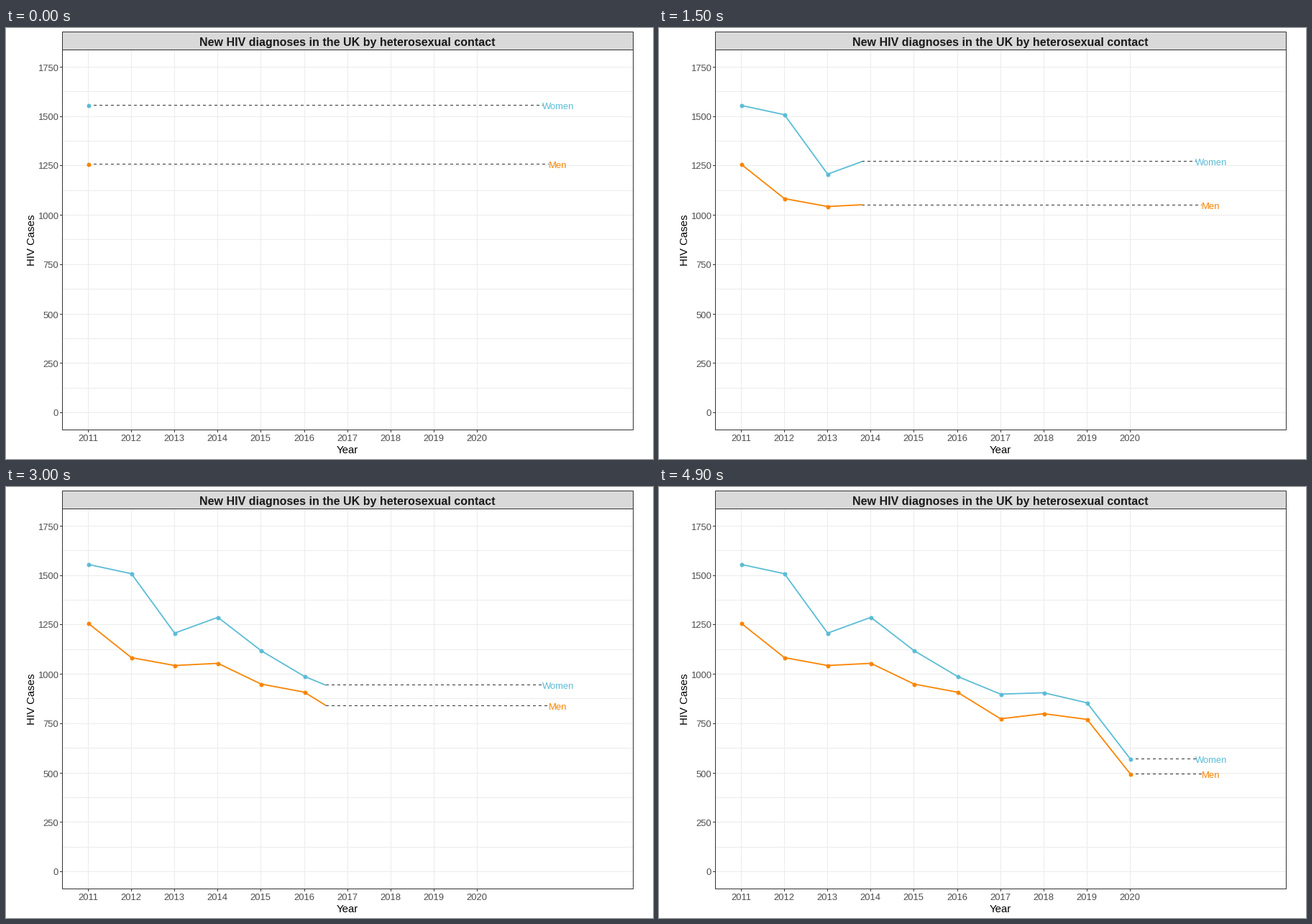
Write a matplotlib script that moves like this. It is 900 px wide and 600 px high and loops after 10000 ms.

```python
import matplotlib.pyplot as plt
import numpy as np
from matplotlib.animation import FuncAnimation
from matplotlib.patches import Rectangle

W, H, DPI = 900, 600, 100
PX = 72 / DPI
FRAMES, INTERVAL, LAST = 100, 100, 49
DARK, GREY, GRID = "#333333", "#4D4D4D", "#EBEBEB"

YEARS = np.arange(2011, 2021)
SERIES = [
    # label, colour, label centre, dash end, yearly cases
    ("Men", "#F98400", 767.5, 755,
     [1260, 1086, 1046, 1057, 952, 911, 776, 802, 773, 497]),
    ("Women", "#5BBCD6", 768.5, 747,
     [1558, 1511, 1210, 1290, 1121, 991, 901, 908, 857, 573]),
]
# Each year is reached on a whole frame
KEYS = np.round(np.linspace(0, LAST, len(YEARS)))

plt.rcParams["font.family"] = "Liberation Sans"
fig = plt.figure(figsize=(W / DPI, H / DPI), dpi=DPI, facecolor="white")
ax = fig.add_axes([0, 0, 1, 1])
ax.set_xlim(0, W)
ax.set_ylim(H, 0)
ax.axis("off")


def x_pos(year):
    return 114.3 + (year - 2011) * 60.145


def y_pos(cases):
    return 535.5 - cases * 0.27486


def centre(v):
    """Middle of the pixel that holds v."""
    return np.floor(v) + 0.5


def line(xs, ys, color, width=1, **kw):
    return ax.plot(xs, ys, color=color, lw=width * PX, snap=False,
                   solid_capstyle="butt", dash_capstyle="butt", **kw)[0]


def text(x, y, s, size, color, ha="center", **kw):
    return ax.text(x, y, s, fontsize=size * PX, color=color, ha=ha,
                   va="baseline", **kw)


def box(top, bottom, fill):
    ax.add_patch(Rectangle((78.5, top), 794, bottom - top, facecolor=fill,
                           edgecolor=DARK, lw=PX, snap=False, zorder=2.5))


def draw_chart():
    for cases in range(0, 1751, 125):
        y = centre(y_pos(cases))
        line([79, 872], [y, y], GRID, zorder=1)
        if cases % 250 == 0:
            line([75, 78], [y, y], DARK)
            text(73, y + 5, str(cases), 13, GREY, ha="right")
    for year in YEARS:
        x = centre(x_pos(year))
        line([x, x], [31, 559], GRID, zorder=1)
        line([x, x], [560, 563], DARK)
        text(x - 0.5, 575, str(year), 13, GREY)
    box(30.5, 559.5, "none")
    box(5.5, 30.5, "#D9D9D9")
    text(475, 25, "New HIV diagnoses in the UK by heterosexual contact",
         16, "#1A1A1A", weight="bold", zorder=4)
    text(475, 592, "Year", 15, "black")
    text(40, 295, "HIV Cases", 15, "black", rotation=90,
         rotation_mode="anchor")


class Trace:
    def __init__(self, label, color, label_x, dash_end, cases):
        self.xs = x_pos(YEARS)
        self.ys = y_pos(np.array(cases)) + 0.5
        self.dash_end = dash_end
        self.dash = line([], [], DARK, ls=(0, (4, 4)), zorder=3)
        self.path = line([], [], color, 1.8, zorder=4,
                         solid_joinstyle="round")
        self.dots = line([], [], color, ls="none", marker="o",
                         markersize=6 * PX, markeredgewidth=0, zorder=5)
        self.label = text(label_x, 0, label, 13, color, zorder=6)

    def update(self, frame):
        pos = np.interp(frame, KEYS, np.arange(len(KEYS)))
        x = np.interp(frame, KEYS, self.xs)
        y = np.interp(frame, KEYS, self.ys)
        seen = int(pos + 1e-9) + 1
        self.path.set_data(np.append(self.xs[:seen], x),
                           np.append(self.ys[:seen], y))
        self.dots.set_data(centre(self.xs[:seen]), centre(self.ys[:seen]))
        row = centre(y)
        self.dash.set_data([np.floor(x), self.dash_end], [row, row])
        self.label.set_y(row + 5.5)
        return [self.dash, self.path, self.dots, self.label]


draw_chart()
traces = [Trace(*s) for s in SERIES]


def update(i):
    frame = min(i, LAST)
    return [a for t in traces for a in t.update(frame)]


anim = FuncAnimation(fig, update, frames=FRAMES, interval=INTERVAL,
                     init_func=lambda: update(0), repeat=True,
                     repeat_delay=0, blit=False)
plt.show()
```
